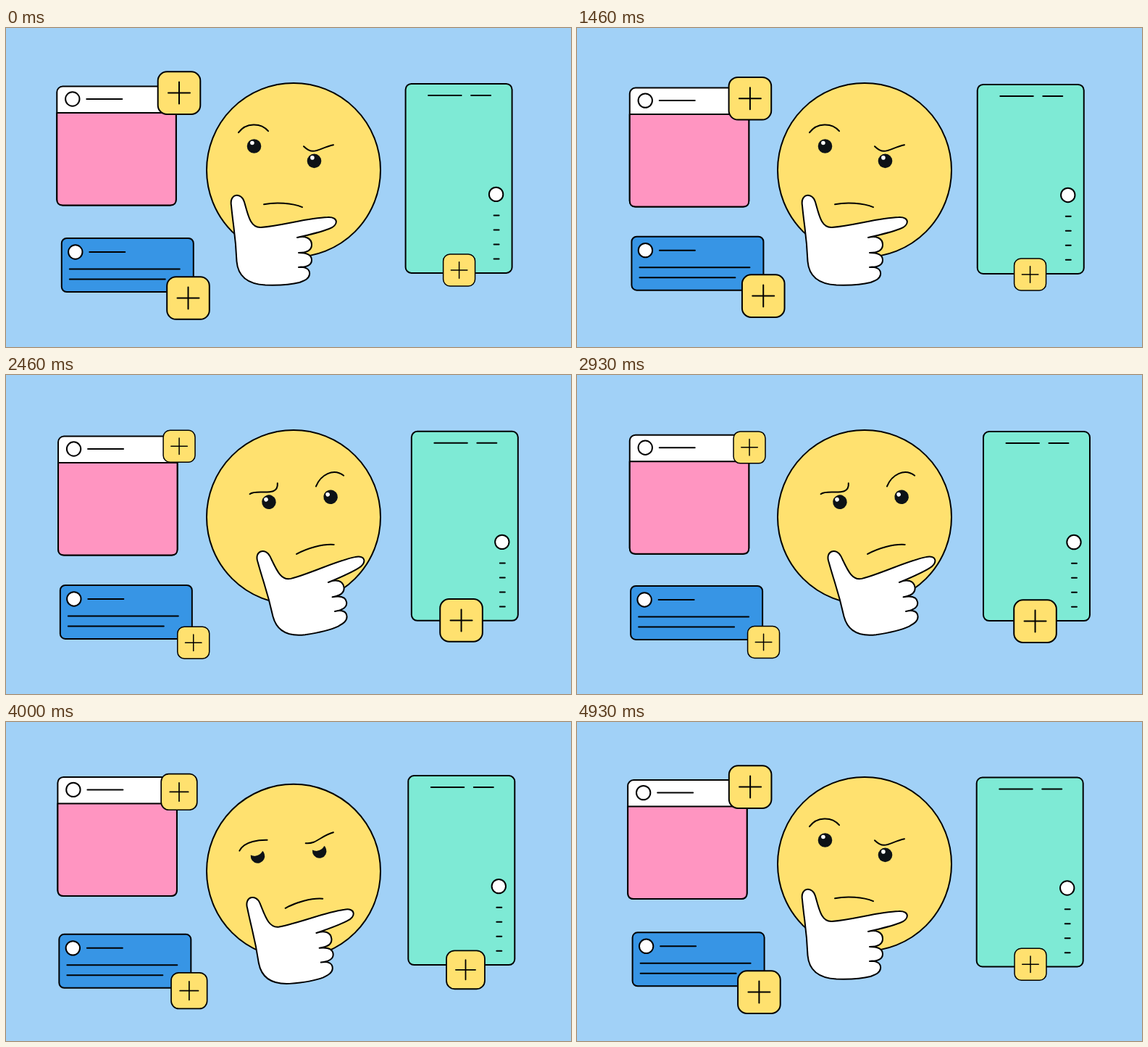
An HTML page that plays this animation: 780x440 px, repeating every 5 s.

```html
<!DOCTYPE html>
<html lang="en">
<head>
<meta charset="utf-8">
<title>Thinking face</title>
<style>
  html, body { margin: 0; width: 100%; height: 100%; overflow: hidden; background: #a1d1f7; }
  svg { display: block; width: 780px; height: 440px; }
  .ink { stroke: #000; stroke-width: 2; stroke-linecap: round; stroke-linejoin: round; }
  .line { fill: none; }
</style>
</head>
<body>
<svg viewBox="0 0 780 440">
  <defs>
    <g id="plus" class="ink">
      <rect x="-29.3" y="-29.3" width="58.6" height="58.6" rx="12.5" fill="#ffe16f"/>
      <path d="M-15 0H15M0 -15V15"/>
    </g>
    <g id="eye">
      <circle r="9.8" fill="#0d1216"/>
      <circle cx="-2.6" cy="-4.5" r="2.8" fill="#fff"/>
    </g>
  </defs>
  <rect width="780" height="440" fill="#a1d1f7"/>

  <g id="pink" class="ink">
    <rect width="164.5" height="164" rx="8" fill="#fff"/>
    <path d="M0 36.5H164.5V156Q164.5 164 156.5 164H8Q0 164 0 156Z" fill="#ff95c1"/>
    <circle cx="21.5" cy="17.5" r="9.7" fill="#fff"/>
    <path d="M41 17.5h49"/>
  </g>
  <g id="blue" class="ink">
    <rect width="182" height="74" rx="7" fill="#3795e5"/>
    <circle cx="19" cy="19" r="9.7" fill="#fff"/>
    <path d="M38.5 19h49M11 42.5h152M11 56.5h132"/>
  </g>
  <g id="green" class="ink">
    <rect width="147" height="261" rx="8" fill="#7eead5"/>
    <circle cx="125" cy="152.5" r="9.7" fill="#fff"/>
    <path d="M31.5 16h45.5M90.5 16h27M122 181.7h7m-7 20h7m-7 20h7m-7 20h7"/>
  </g>
  <use id="plusPink" href="#plus"/>
  <use id="plusBlue" href="#plus"/>
  <use id="plusGreen" href="#plus"/>

  <g id="head">
    <circle class="ink" cx="397" cy="196" r="120" fill="#ffe16f"/>
    <!-- Features are placed around the midpoint between the eyes -->
    <g id="features">
      <g transform="translate(-41.5 -10.2)"><use href="#eye"/><circle class="lid" r="12" fill="#ffe16f"/></g>
      <g transform="translate(41.5 10.2)"><use href="#eye"/><circle class="lid" r="12" fill="#ffe16f"/></g>
      <g id="brows" class="ink line"><path id="browL"/><path id="browR"/></g>
      <path class="ink line" d="M-28 70C-12 67 11 68 25 74"/>
    </g>
  </g>
  <path id="hand" class="ink" fill="#fff" d="M311 245C308 228 325 226 329 240C334 257 337 276 352 275
    C385 272 415 262 444 261C460 260 459 273 446 277C433 282 420 285 402 289
    C413 286 422 290 422 299C422 307 414 310 404 310C416 310 422 313 422 320
    C422 328 414 330 404 330C414 329 420 333 419 340C418 347 410 349 405 351
    C390 355 375 355 358 354.5C330 353 320 340 318.5 322C317 285 314 277 311 245Z"/>
</svg>
<script>
const LOOP = 5000;
const TURN = [1740, 2240], BACK = [3780, 4300];
const el = id => document.getElementById(id);
const lids = document.querySelectorAll('.lid');

const mix = (a, b, k) => a + (b - a) * k;
const part = (t, [from, to]) => Math.min(1, Math.max(0, (t - from) / (to - from)));
const ease = x => x * x * (3 - 2 * x);
const hump = (t, span) => Math.sin(Math.PI * part(t, span));

// 0 looking right, 1 looking left; the move fills a share of each turn
function turned(t, from = 0, to = 1) {
  const move = span => ease(part(part(t, span), [from, to]));
  return move(TURN) - move(BACK);
}

function place(id, x, y, extra = '') {
  el(id).setAttribute('transform', `translate(${x} ${y}) ${extra}`);
}

// Everything floats on one slow wave and one twice as fast
function drawCards(t) {
  const a = 2 * Math.PI * t / LOOP;
  const c = Math.cos(a), s = Math.sin(a), c2 = Math.cos(2 * a), s2 = Math.sin(2 * a);
  const swap = turned(t) - 0.06 * hump(t, [4250, 4750]);
  const shrink = `scale(${mix(1, 0.75, swap)})`, grow = `scale(${mix(0.75, 1, swap)})`;

  place('pink', 71.9 - 0.9 * c + 0.4 * s - 0.7 * c2 + 0.7 * s2, 81 - 2 * c + 2.9 * s + 1.5 * c2 + 0.9 * s2);
  place('blue', 75.1 + c + 1.4 * s + 0.7 * c2 + 0.3 * s2, 290 - 2.7 * s - 0.5 * s2);
  place('green', 555.1 - 4.2 * c - 2.6 * s + 0.7 * (c2 + s2), 77.1 - 0.5 * c + 1.8 * s + 0.3 * c2 + 1.5 * s2);
  place('plusPink', 238.7 + 0.3 * c2 - 0.9 * s2, 95.8 - 4.4 * c - s - 1.8 * c2 + 0.7 * s2, shrink);
  place('plusBlue', 255.1 - 3.6 * c + 1.2 * s, 370.2 + 1.7 * c + 0.6 * c2 - 0.7 * s2, shrink);
  place('plusGreen', 628.9 - 1.6 * c - 5.2 * s - 1.7 * c2 + 0.4 * s2,
    338.6 - 2.2 * c - 1.6 * s - 2.4 * c2 - 0.7 * s2, grow);
}

// A brow keeps its ends; only its bend changes
function bend(id, start, end, [x1, y1, x2, y2], [u1, v1, u2, v2], k) {
  const p = `${mix(x1, u1, k)} ${mix(y1, v1, k)} ${mix(x2, u2, k)} ${mix(y2, v2, k)}`;
  el(id).setAttribute('d', `M${start}C${p} ${end}`);
}

function drawFace(t) {
  const slide = turned(t, 0, 0.65), tilt = turned(t, 0.5, 1), swing = turned(t);
  const blink = hump(t, TURN) + hump(t, BACK);

  place('head', 0, 10.1 * blink);
  place('features', 384 + 21.5 * slide, 173.2 - 1.5 * tilt, `rotate(${-18.5 * tilt})`);
  place('brows', 0, 4 * blink);
  bend('browL', '-63 -29', '-22 -31', [-53, -43, -32, -43], [-51, -33, -27, -11], slide);
  bend('browR', '27 -10', '68 -12', [41, 4, 48, -8], [38, -23, 58, -27], slide);
  lids.forEach(lid => lid.setAttribute('cy', -24 + 11.3 * blink));
  place('hand', 43 * swing, 4 * blink - 3 * swing, `rotate(${-10 * swing} 402 289)`);
}

// 15 pictures per second, held on a 10 ms clock
const hold = t => (Math.ceil((Math.floor(t / 10) + 1) * 3 / 20) - 1) * 200 / 3;

const start = performance.now();
function tick() {
  const t = hold((performance.now() - start) % LOOP);
  drawCards(t);
  drawFace(t);
  requestAnimationFrame(tick);
}
tick();
</script>
</body>
</html>
```
